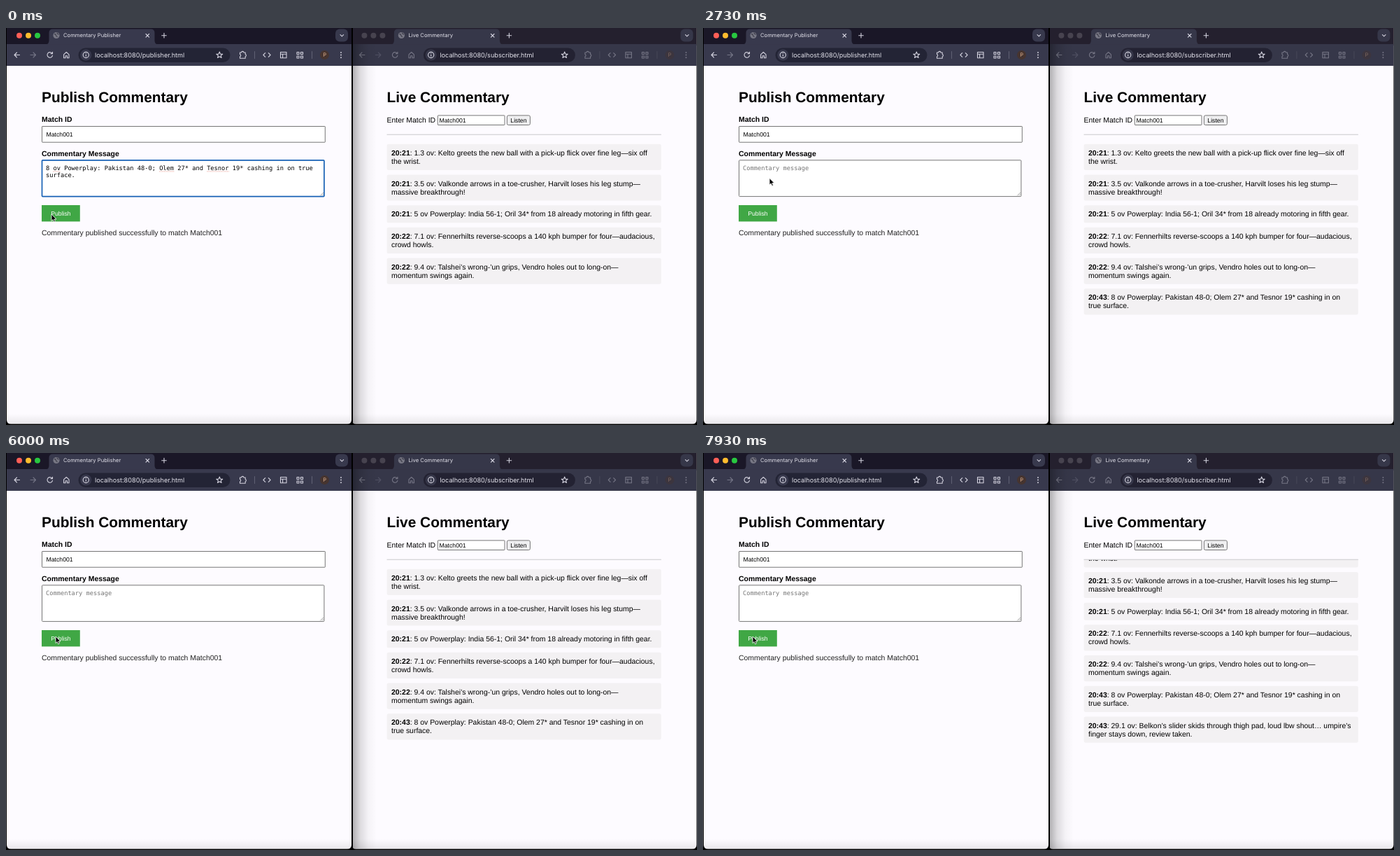
These frames come from a looping animation (988x567 px, 8000 ms). An HTML page:

```html
<!DOCTYPE html>
<html lang="en">
<head>
<meta charset="utf-8">
<title>Live Commentary</title>
<style>
  html, body { margin: 0; width: 100%; height: 100%; overflow: hidden; background: #000; }
  svg { display: block; }
  text { font-family: "Liberation Sans", Arial, sans-serif; font-size: 10.44px; fill: #000; text-rendering: geometricPrecision; white-space: pre; }
  .b { font-weight: 700; }
  .h1 { font-size: 20.88px; font-weight: 700; }
  .form { font-size: 8.7px; }
  .mono { font-family: "DejaVu Sans Mono", monospace; font-size: 8.7px; }
  .tab { font-family: Inter, sans-serif; font-size: 7.65px; fill: #e2e1ea; }
  .url { font-family: Inter, sans-serif; font-size: 9.13px; fill: #e4e3ec; }
  .icon { fill: none; stroke: #d3d2de; stroke-width: 1.1; stroke-linecap: round; stroke-linejoin: round; }
  .field { fill: #fff; stroke: #767676; stroke-width: 1; }
  .typo { stroke: #dd6a5c; stroke-width: 1; stroke-dasharray: 1 1.2; opacity: .75; }
</style>
</head>
<body>
<svg id="stage" width="988" height="567" viewBox="0 0 988 567">
  <defs>
    <linearGradient id="side">
      <stop offset="0" stop-opacity=".3"/><stop offset=".3" stop-opacity=".13"/>
      <stop offset=".65" stop-opacity=".035"/><stop offset="1" stop-opacity="0"/>
    </linearGradient>
    <linearGradient id="floor" x2="0" y2="1">
      <stop offset="0" stop-opacity="0"/><stop offset="1" stop-opacity=".08"/>
    </linearGradient>
    <clipPath id="listClip"><rect x="540" y="152.5" width="400" height="267.5"/></clipPath>
  </defs>
  <rect width="988" height="567"/>
  <g id="windows"></g>

  <g id="publisher">
    <text class="h1" x="51" y="105.8">Publish Commentary</text>
    <text class="b" x="51" y="134.4">Match ID</text>
    <rect class="field" x="51.5" y="140.5" width="404.8" height="22.7" rx=".5"/>
    <text class="form" x="57.5" y="154.8">Match001</text>
    <text class="b" x="51" y="182.7">Commentary Message</text>
    <rect id="box" class="field" x="51.5" y="188.8" width="403.4" height="51.8" rx="1"/>
    <path d="M449.5 239.3l4.5-4.5M452 239.3l2-2" stroke="#777" stroke-width=".7"/>
    <text id="hint" class="mono" x="57" y="202.7" style="fill:#757575">Commentary message</text>
    <g id="drafts"></g>
    <rect id="caret" width=".9" height="10.4"/>
    <rect x="51" y="253" width="54.8" height="23.4" fill="#40a745"/>
    <text class="form" x="64.2" y="267.8" style="fill:#fff">Publish</text>
    <text x="51" y="295.8" style="fill:#222">Commentary published successfully to match Match001</text>
  </g>

  <g id="subscriber">
    <text class="h1" x="544.5" y="105.8">Live Commentary</text>
    <text x="544.5" y="134.9">Enter Match ID</text>
    <rect class="field" x="617.4" y="124.9" width="95.6" height="13.6" rx=".5"/>
    <text class="form" x="619.5" y="134.7">Match001</text>
    <rect class="field" x="716.4" y="124.9" width="33" height="13.6" rx="2" style="fill:#efeff1"/>
    <text class="form" x="721.3" y="134.7">Listen</text>
    <g clip-path="url(#listClip)"><g id="list"></g></g>
    <path d="M544.5 152.2h392.4" stroke="#c9c8cb"/>
    <rect id="thumb" x="931" y="188" width="4.6" height="231" rx="2.3" fill="#747277"/>
  </g>

  <path id="pointer" d="M0 0V9.6L2.2 7.6L3.7 11L5.4 10.2L3.9 7H7Z" stroke="#fff" stroke-width=".8" stroke-linejoin="round"/>
</svg>
<script>
const LOOP = 8000;
const $ = id => document.getElementById(id);

// Browser windows
const puzzle = 'M334.5 35h2.2a1.6 1.6 0 0 1 3.2 0h2.3v2.6a1.6 1.6 0 0 1 0 3.1v2.5h-7.7v-2.5a1.6 1.6 0 0 0 0-3.1z';
const star = Array.from({ length: 10 }, (_, i) => {
  const r = i % 2 ? 2 : 4.7, a = i * Math.PI / 5;
  return (305.3 + r * Math.sin(a)).toFixed(2) + ' ' + (38.7 - r * Math.cos(a)).toFixed(2);
}).join('L');
const squares = [[416, 34.5], [421.5, 34.5], [416, 40], [421.5, 40]]
  .map(([x, y]) => `<rect x="${x}" y="${y}" width="3" height="3"/>`).join('');

function browser({ x, title, url, strip, bar, pill, lights, dim }) {
  const light = (c, i) => `<circle cx="${19 + 13 * i}" cy="10.8" r="4" fill="${c}"/>`;
  return `<g transform="translate(${x})">
    <path d="M1 0H494V559.5q0 6-6 6H7q-6 0-6-6z" fill="#fdfbff"/>
    <rect x="1" width="493" height="25" fill="${strip}"/>
    <rect x="1" y="23" width="493" height="31" fill="${bar}"/>
    <path d="M56 23.5q5.5 0 5.5-5.5V7q0-5.5 5.5-5.5H207q5.5 0 5.5 5.5V18q0 5.5 5.5 5.5z" fill="${bar}"/>
    ${lights.map(light).join('')}
    <circle cx="72" cy="10.5" r="4.6" fill="#777784"/>
    <path d="M69 8.5q2 0 2.5 2t2 2M73 6.5q0 2 2.5 2.5" fill="none" stroke="#42424f" stroke-width="1.3"/>
    <text class="tab" x="82" y="13.3">${title}</text>
    <rect x="471" y="1.5" width="18" height="18" rx="6" fill="${bar}"/>
    <rect x="103.5" y="28.5" width="217" height="20.5" rx="10.2" fill="${pill}"/>
    <circle cx="114.3" cy="38.5" r="8" fill="${bar}"/>
    <text class="url" x="127" y="41.8">${url}</text>
    <g class="icon">
      <path d="M200 8.5l4.6 4.6M204.6 8.5l-4.6 4.6M226 7.4v6.6M222.7 10.7h6.6M478 9.6l2.3 2.3 2.3-2.3"/>
      <circle cx="114.3" cy="38.5" r="4.1"/><path d="M114.3 38.3v2M114.3 36.4v.1"/>
      <path d="M${star}Z"/>
    </g>
    <g class="icon" opacity="${dim}">
      <path d="M19.5 38.5h-7.5M15.5 35l-3.5 3.5 3.5 3.5"/>
      <path d="M35 38.5h7.5M39 35l3.5 3.5-3.5 3.5" opacity=".4"/>
      <path d="M66 36.4a3.8 3.8 0 1 0 .5 3M66.5 34.3v2.5h-2.5"/>
      <path d="M82.6 37.8l3.7-3.3 3.7 3.3v4.9h-2.5v-3h-2.4v3h-2.5z"/>
      <path d="${puzzle}"/>
      <path d="M355.5 33.5v10M437.5 33.5v10" opacity=".25"/>
      <path d="M370.7 35.7l-2.8 2.8 2.8 2.8M375.3 35.7l2.8 2.8-2.8 2.8"/>
      <path d="M392.5 34.5h8.5v8.3h-8.5zM392.5 37.3h8.5M395.6 37.3v5.5"/>
      ${squares}
      <circle cx="455.5" cy="38.5" r="6.5" style="fill:#46342f;stroke:none"/>
      <path d="M479 34.9v.1M479 38.5v.1M479 42.1v.1" stroke-width="1.9"/>
    </g>
    <text class="tab" x="453.2" y="41.2" style="fill:#e0b391" opacity="${dim}">P</text>
    <path d="M1 551H494V559.5q0 6-6 6H7q-6 0-6-6z" fill="url(#floor)"/>
  </g>`;
}

$('windows').innerHTML = browser({
  x: 0, title: 'Commentary Publisher', url: 'localhost:8080/publisher.html',
  strip: '#1a1727', bar: '#38394d', pill: '#232435', lights: ['#ff5f57', '#febc2e', '#28c840'], dim: 1
}) + browser({
  x: 493.4, title: 'Live Commentary', url: 'localhost:8080/subscriber.html',
  strip: '#24202e', bar: '#363749', pill: '#232232', lights: Array(3).fill('#47434f'), dim: .4
}) + '<rect x="494" width="2" height="567"/><rect x="496" y="23" width="34" height="542" fill="url(#side)"/>';

// Message cards
const LINE = 12.07;
const messages = [
  ['20:21', '1.3 ov: Kelto greets the new ball with a pick-up flick over fine leg—six off', 'the wrist.'],
  ['20:21', '3.5 ov: Valkonde arrows in a toe-crusher, Harvilt loses his leg stump—', 'massive breakthrough!'],
  ['20:21', '5 ov Powerplay: India 56-1; Oril 34* from 18 already motoring in fifth gear.'],
  ['20:22', '7.1 ov: Fennerhilts reverse-scoops a 140 kph bumper for four—audacious,', 'crowd howls.'],
  ['20:22', '9.4 ov: Talshei’s wrong-’un grips, Vendro holes out to long-on—', 'momentum swings again.'],
  ['20:43', '8 ov Powerplay: Pakistan 48-0; Olem 27* and Tesnor 19* cashing in on', 'true surface.'],
  ['20:43', '29.1 ov: Belkon’s slider skids through thigh pad, loud lbw shout… umpire’s', 'finger stays down, review taken.']
];
let cardY = 165.7;
$('list').innerHTML = messages.map(([time, first, second]) => {
  const y = cardY, h = 13.05 + LINE * (second ? 2 : 1);
  cardY += h + 6.53;
  return `<g><rect x="544.6" y="${y}" width="392.2" height="${h}" rx="2.6" fill="#f3f1f3"/>
    <text x="551" y="${y + 16.1}"><tspan class="b">${time}</tspan>: ${first}</text>
    <text x="551" y="${y + 16.1 + LINE}">${second || ''}</text></g>`;
}).join('');
const cards = [...$('list').children];

// Text area drafts; typos are [first column, length]
const COL = 5.238;
const drafts = [
  { lines: ['8 ov Powerplay: Pakistan 48-0; Olem 27* and Tesnor 19* cashing in on true', 'surface.'], typos: [[2, 2], [31, 4], [44, 6]] },
  { lines: ['29.1 ov: Belkon’s slider skids through thigh pad, loud lbw shout… umpire’s', 'finger stays down, review taken.'], typos: [[5, 2]] }
];
$('drafts').innerHTML = drafts.map(({ lines, typos }) => '<g>' +
  lines.map((s, i) => `<text class="mono" x="57" y="${202.7 + 10.2 * i}">${s}</text>`).join('') +
  typos.map(([c, n]) => `<path class="typo" d="M${57 + c * COL} 204.9h${n * COL}"/>`).join('') + '</g>').join('');
const [oldDraft, newDraft] = $('drafts').children;

// Timeline
const T = { blur: 70, clear: 200, post: 1600, focus: 2830, paste: 4870, blur2: 5730, clear2: 5870, post2: 6130 };
const path = [[0, 65, 266], [400, 65, 266], [670, 65.5, 266.5], [2330, 65.5, 266.5], [2660, 95, 214.5],
  [2830, 95, 214.5], [3000, 79, 211.5], [5270, 79, 211.5], [5600, 71, 262], [LOOP, 71, 262]];

function pointerAt(t) {
  const i = path.findIndex(p => p[0] > t);
  const [t0, x0, y0] = path[i - 1], [t1, x1, y1] = path[i];
  const u = (t - t0) / (t1 - t0), k = u * u * (3 - 2 * u);
  return [x0 + (x1 - x0) * k, y0 + (y1 - y0) * k];
}
const show = (el, on) => { el.style.display = on ? '' : 'none'; };
const within = (t, a, b) => t >= a && t < b;

function render(t) {
  const hasOld = t < T.clear, hasNew = within(t, T.paste, T.clear2);
  const focused = t < T.blur || within(t, T.focus, T.blur2);
  show(oldDraft, hasOld);
  show(newDraft, hasNew);
  show($('hint'), !hasOld && !hasNew);
  $('box').style.stroke = focused ? '#1862b5' : '';
  $('box').style.strokeWidth = focused ? 1.7 : '';

  const since = t - (hasNew ? T.paste : T.focus);
  show($('caret'), within(t, T.focus, T.blur2) && since % 1000 < 500);
  $('caret').setAttribute('x', hasNew ? 57 + 32 * COL : 57);
  $('caret').setAttribute('y', hasNew ? 204.6 : 194.4);

  show(cards[5], t >= T.post);
  show(cards[6], t >= T.post2);
  $('list').setAttribute('transform', `translate(0 ${t >= T.post2 ? -39.5 : 0})`);
  $('thumb').style.opacity = t < T.post2 ? 0 : Math.max(0, Math.min(1, (6870 - t) / 250));
  $('pointer').setAttribute('transform', `translate(${pointerAt(t)})`);
}

function tick() {
  render(performance.now() % LOOP);
  requestAnimationFrame(tick);
}
tick();
</script>
</body>
</html>
```
